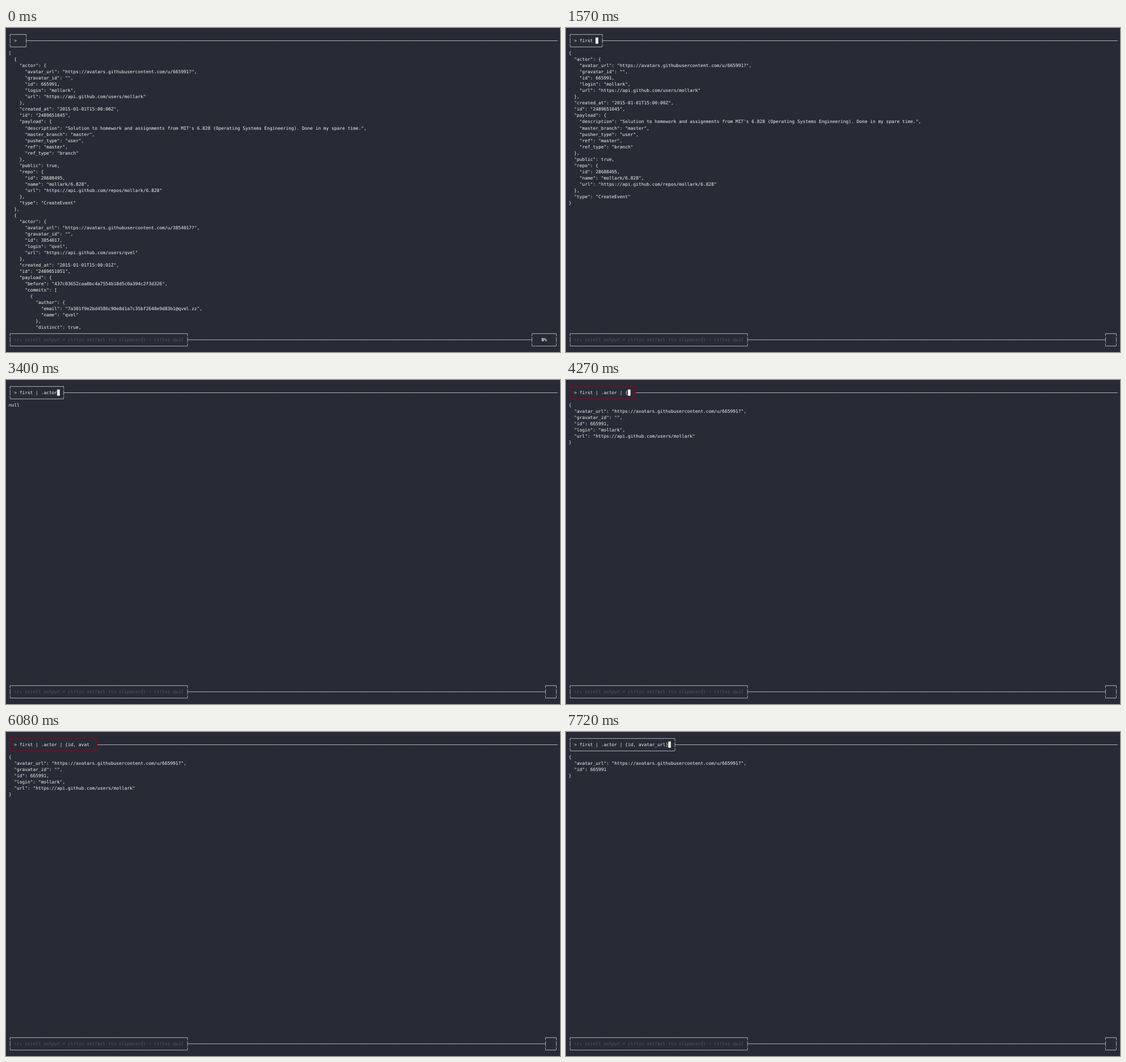
Animation of 977 by 573 pixels, one loop 8 s. Source, as an HTML page with a canvas:

```html
<!DOCTYPE html>
<html lang="en">
<head>
<meta charset="utf-8">
<title>Interactive JSON query</title>
<style>
  html, body { margin: 0; width: 100%; height: 100%; overflow: hidden; background: #282a36; }
  canvas { display: block; }
</style>
</head>
<body>
<canvas id="screen" width="977" height="573"></canvas>
<script>
const ctx = document.getElementById('screen').getContext('2d');
const LOOP = 8000, COLS = 204, PAGE = 45;
const CELL_W = 4.745, CELL_H = 11.02, LEFT = 4.7, TOP = 5.75, BASELINE = 8.45;
const BG = '#282a36', FG = '#f8f8f2', DIM = '#56575f', RED = '#a0000c';
const FONT = '7.885px "DejaVu Sans Mono", monospace';

const API = 'https://api.github.com/';
const actor = (id, login) => ({
  avatar_url: `https://avatars.githubusercontent.com/u/${id}?`,
  gravatar_id: '', id, login, url: `${API}users/${login}`
});
const repo = (id, name) => ({ id, name, url: `${API}repos/${name}` });

function pushEvent(user, second, id, before, author, message, sha, pushId, project) {
  return {
    actor: user,
    created_at: `2015-01-01T15:00:${second}Z`,
    id,
    payload: {
      before,
      commits: [{ author, distinct: true, message, sha, url: `${project.url}/commits/${sha}` }],
      distinct_size: 1, head: sha, push_id: pushId, ref: 'refs/heads/master', size: 1
    },
    public: true,
    repo: project,
    type: 'PushEvent'
  };
}

const events = [
  {
    actor: actor(665991, 'mollark'),
    created_at: '2015-01-01T15:00:00Z',
    id: '2489651045',
    payload: {
      description: "Solution to homework and assignments from MIT's 6.828 " +
        '(Operating Systems Engineering). Done in my spare time.',
      master_branch: 'master', pusher_type: 'user', ref: 'master', ref_type: 'branch'
    },
    public: true,
    repo: repo(28688495, 'mollark/6.828'),
    type: 'CreateEvent'
  },
  pushEvent(actor(3854017, 'qvel'), '01', '2489651051',
    '437c03652caa0bc4a7554b18d5c0a394c2f3d326',
    { email: '7a301f9e2bd4586c90e8d1a7c35bf2640e9d83b1@qvel.zz', name: 'qvel' },
    'Fix main header height on mobile', '6b089eb4a43f728f0a594388092f480f2ecacfcd',
    536863970, repo(28671719, 'qvel/qvel-theme')),
  pushEvent(actor(6339799, 'tavuneo'), '01', '2489651053',
    '590433109f221a96cf19ea7a7d9a43ca333e3b3e',
    { email: 'c81e07b35d9af2461e70b8c4d52f93a60b7e14d8@vumel.zzz', name: 'Minsera Ko' },
    `#20${' '.repeat(29)}\n\n${' '.repeat(33)}.\n${' '.repeat(23)}.`,
    'ec819b9df4fe612bb35bf562f96810bf991f9975',
    536863972, repo(28671720, 'tavuneo/xe-module-ajaxboard'))
];

const lines = value => JSON.stringify(value, null, 2).split('\n');
const [first] = events;
const { avatar_url, id } = first.actor;
const views = [
  [0, lines(events).slice(0, PAGE)],
  [1150, lines(events).slice(PAGE, 2 * PAGE)],
  [1490, lines(first)],
  [2870, lines(null)],
  [3450, lines(first.actor)],
  [7720, lines({ avatar_url, id })]
];

const QUERY = 'first | .actor | {id, avatar_url}';
const keyTimes = [
  1150, 1270, 1340, 1410, 1490, 1570, 2240, 2550, 2750, 2870, 2920,
  3120, 3270, 3400, 3890, 4050, 4130, 4270, 4700, 4780, 5000, 5090, 5170,
  5320, 5430, 5550, 6570, 6640, 6870, 7120, 7220, 7320, 7670
];
const invalidSpans = [[1190, 1490], [2240, 2790], [4050, 7720]];
const blinkOffSpans = [[0, 590], [2100, 2240], [6080, 6570]];
const within = (spans, t) => spans.some(([from, to]) => t >= from && t < to);

const cellX = col => LEFT + col * CELL_W;
const cellY = row => TOP + row * CELL_H;

// Every character sits on the terminal grid.
function print(col, row, text, color = FG, weight = '') {
  ctx.fillStyle = color;
  ctx.font = `${weight} ${FONT}`;
  ctx.textRendering = 'geometricPrecision';
  [...text].forEach((char, i) => {
    if (char !== ' ') ctx.fillText(char, cellX(col + i), cellY(row) + BASELINE);
  });
}

function box(row, from, to, left, right) {
  const edge = '─'.repeat(to - from - 1);
  print(from, row, `╭${edge}╮`);
  print(from, row + 1, left);
  print(to, row + 1, right);
  print(from, row + 2, `╰${edge}╯`);
}

const rule = (row, from, to) => print(from, row, '─'.repeat(to - from));

function drawHeader(typed, invalid, cursorOn) {
  const cursor = 4 + typed.length, border = cursor + 2;
  if (invalid) {
    const x = cellX(0.5);
    ctx.strokeStyle = RED;
    ctx.lineWidth = 1;
    ctx.strokeRect(x, cellY(0.52), cellX(border + 0.5) - x, 2 * CELL_H);
  } else {
    box(0, 0, border, '│', '├');
  }
  rule(1, border + 1, COLS);
  print(2, 1, `> ${typed}`);
  if (cursorOn) {
    ctx.fillStyle = FG;
    ctx.fillRect(cellX(cursor), cellY(1), CELL_W, CELL_H);
  }
  if (!typed) print(cursor, 1, '.', cursorOn ? BG : DIM);
}

function drawFooter(percent) {
  const last = COLS - 1, start = percent ? 194 : 199;
  box(48, 0, 66, '│', '├');
  print(2, 49, '↑/↓ scroll output • ctrl+x extract (to clipboard) • ctrl+c quit', DIM);
  rule(49, 67, start);
  box(48, start, last, '┤', '│');
  print(start + 4, 49, percent, FG, 'bold');
}

let shown = '';
function frame(now) {
  const t = now % LOOP;
  const count = keyTimes.filter(time => time <= t).length;
  const view = views.filter(([time]) => time <= t).length - 1;
  const invalid = within(invalidSpans, t);
  const cursorOn = !within(blinkOffSpans, t);
  const state = [count, view, invalid, cursorOn].join();
  if (state !== shown) {
    shown = state;
    ctx.fillStyle = BG;
    ctx.fillRect(0, 0, 977, 573);
    drawHeader(QUERY.slice(0, count), invalid, cursorOn);
    views[view][1].forEach((line, i) => print(0, 3 + i, line));
    drawFooter(view < 2 ? '0%' : '');
  }
  requestAnimationFrame(frame);
}
frame(performance.now());
</script>
</body>
</html>
```
